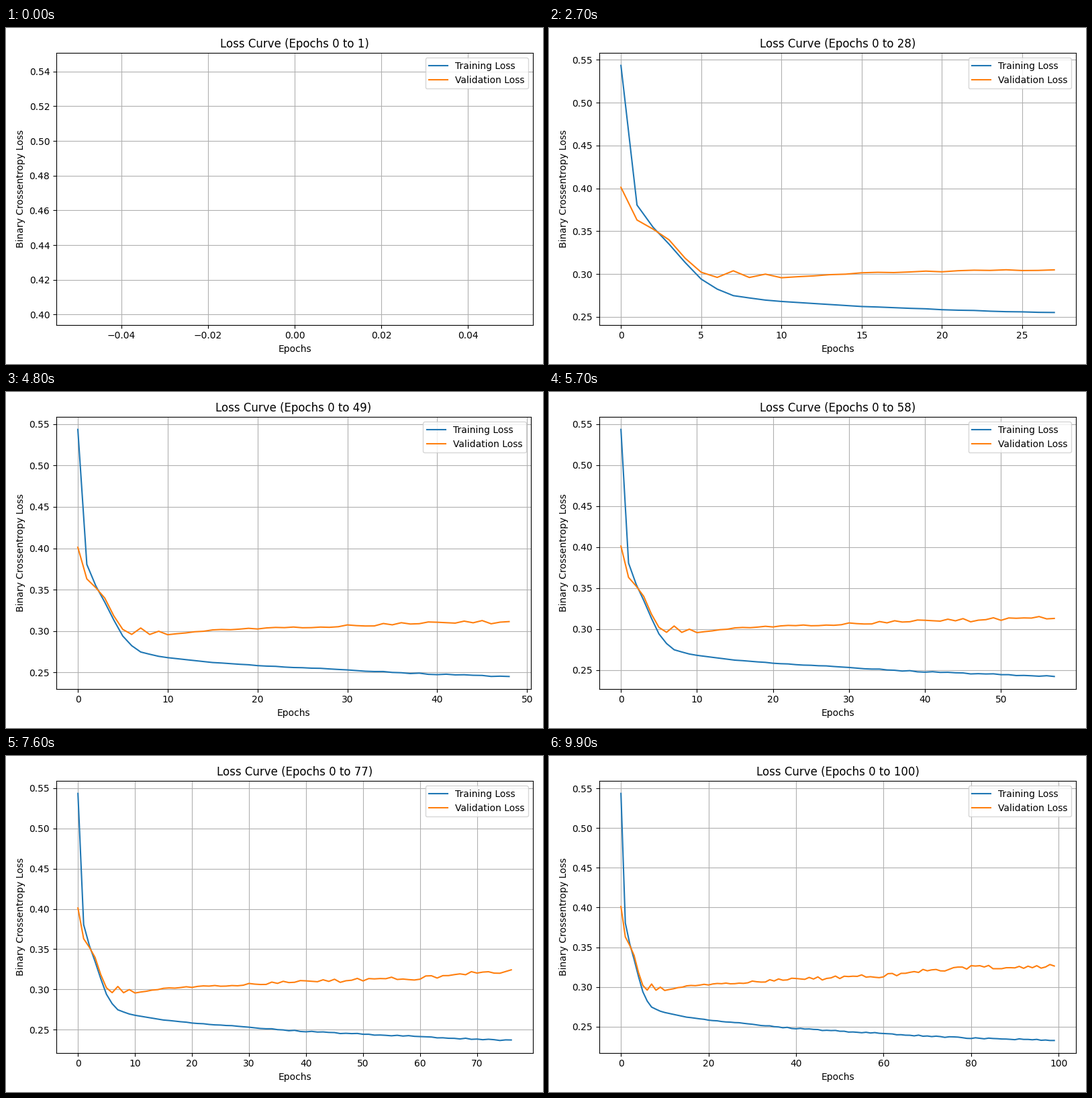
Write a matplotlib script that moves like this. It is 800 px wide and 500 px high and loops after 10 s.

```python
import numpy as np
import matplotlib.pyplot as plt
from matplotlib.animation import FuncAnimation

plt.rcParams["font.family"] = "DejaVu Sans"

EPOCHS = 100
INTERVAL = 100  # ms
KNOTS = [*range(11), 15, 20, 30, 40, 60, 70, 80, 99]

rng = np.random.default_rng(7)
epochs = np.arange(EPOCHS)


def loss_curve(levels, jitter):
    """Piecewise trend through the knots, with noise that sets in after epoch 10."""
    ramp = np.clip((epochs - 10) / 30, 0, 1)
    noise = jitter * ramp * rng.uniform(-1, 1, EPOCHS)
    return np.interp(epochs, KNOTS, levels) + noise


train = loss_curve([0.5435, 0.3805, 0.3546, 0.3348, 0.3134, 0.2940, 0.2823,
                    0.2747, 0.2720, 0.2695, 0.2679, 0.2620, 0.2584, 0.2531,
                    0.2477, 0.2413, 0.2381, 0.2356, 0.2332], 0.0007)
val = loss_curve([0.4012, 0.3630, 0.3524, 0.3398, 0.3184, 0.3020, 0.2960,
                  0.3037, 0.2959, 0.2998, 0.2956, 0.3012, 0.3033, 0.3060,
                  0.3095, 0.3141, 0.3205, 0.3248, 0.3262], 0.0024)

fig, ax = plt.subplots(figsize=(8, 5), dpi=100)
train_line, = ax.plot([], [], label="Training Loss")
val_line, = ax.plot([], [], label="Validation Loss")
ax.set_xlabel("Epochs")
ax.set_ylabel("Binary Crossentropy Loss")
ax.grid(True)
ax.legend(loc="upper right")


def update(i):
    n = i + 1
    train_line.set_data(epochs[:n], train[:n])
    val_line.set_data(epochs[:n], val[:n])
    ax.relim()
    ax.autoscale_view()
    ax.set_title(f"Loss Curve (Epochs 0 to {n})")
    fig.tight_layout()
    return train_line, val_line


def reset():
    fig.subplots_adjust(left=0.125, right=0.9, bottom=0.11, top=0.88)
    return update(0)


anim = FuncAnimation(fig, update, frames=EPOCHS, init_func=reset,
                     interval=INTERVAL, repeat=True, repeat_delay=0)
plt.show()
```
